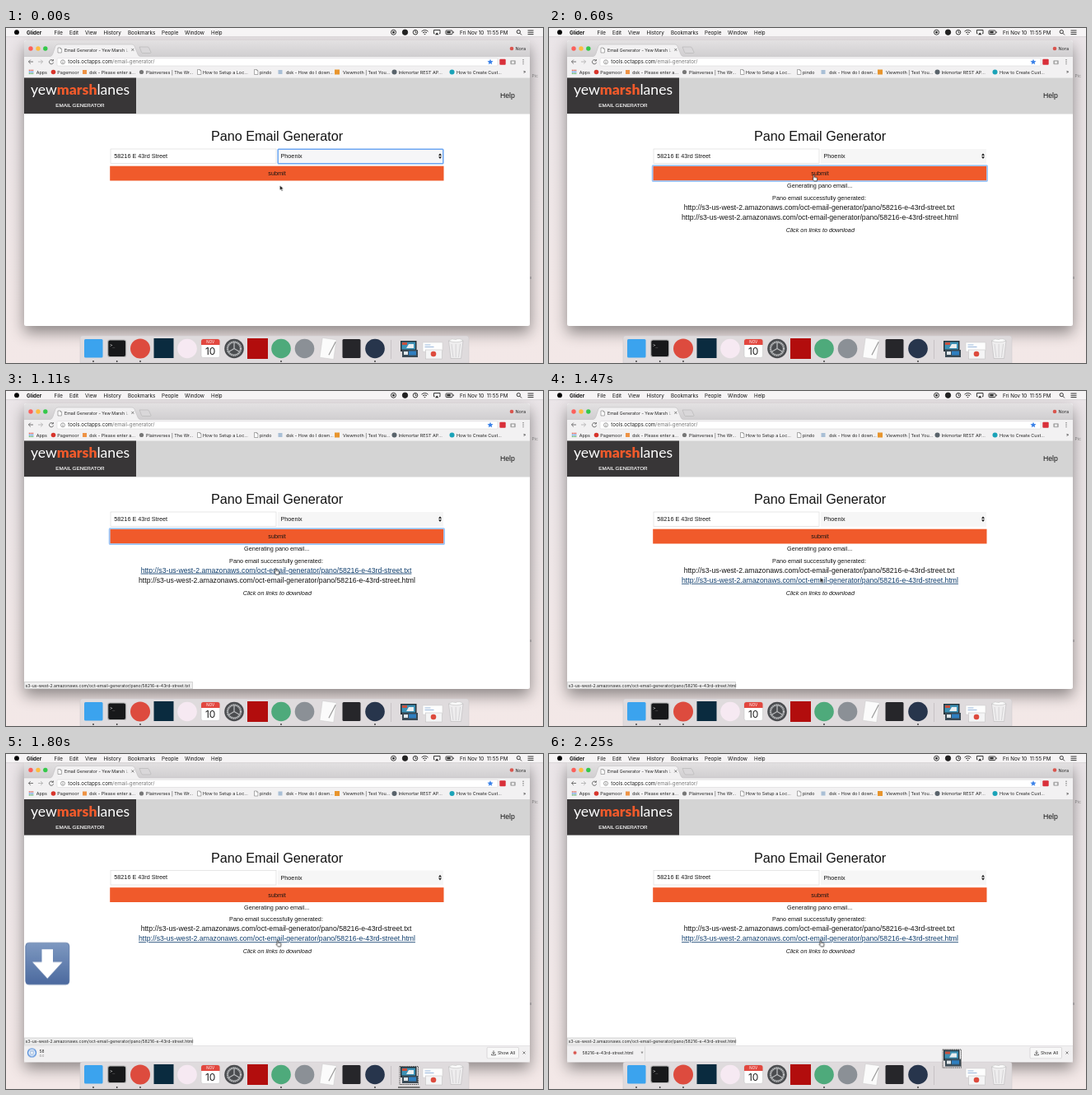
An HTML page for the animation above (2280 ms loop, 652 by 407 pixels).

```html
<!DOCTYPE html>
<html lang="en">
<head>
<meta charset="utf-8">
<title>Pano Email Generator</title>
<style>
html, body { margin: 0; width: 100%; height: 100%; overflow: hidden; background: #ebe6e8; }
svg { display: block; width: 652px; height: 407px; }
text { font: 6.25px Inter, sans-serif; fill: #111; white-space: pre; }
.mid { text-anchor: middle; }
.ui text { font-size: 5.45px; fill: #222; }
.page text { font: 7.24px "Liberation Sans", Arial, sans-serif; fill: #141414; }
.page .h1 { font-size: 16.2px; }
.page .big { font-size: 8.69px; }
.page .logo { font: 400 17.6px Lato, sans-serif; fill: #fff; }
.logo tspan { font-weight: 900; fill: #f05a2b; }
.page .sub { font-size: 6.25px; fill: #fff; stroke: #fff; stroke-width: .15px; }
.page .it { font-style: italic; }
.small text { font-size: 5.15px; fill: #222; }

/* s: hard switches, m: motion; --k names the keyframes */
.s, .m { animation: var(--k) 2280ms step-end infinite; }
.m { animation-timing-function: linear; }

@keyframes pick { 0% { visibility: visible } 13.16%, 100% { visibility: hidden } }
@keyframes press { 0%, 60.53%, 100% { visibility: hidden } 13.16% { visibility: visible } }
@keyframes working { 0% { visibility: hidden } 14.47%, 100% { visibility: visible } }
@keyframes done { 0% { visibility: hidden } 19.74%, 100% { visibility: visible } }
@keyframes link1 {
  0%, 55.26%, 100% { fill: #141414; text-decoration-line: none }
  43.42% { fill: #12406f; text-decoration-line: underline }
}
@keyframes link2 {
  0% { fill: #141414; text-decoration-line: none }
  55.26%, 100% { fill: #12406f; text-decoration-line: underline }
}
@keyframes status { 0% { visibility: hidden } 48.68%, 100% { visibility: visible } }
@keyframes url1 { 0% { opacity: 1 } 55.26%, 100% { opacity: 0 } }
@keyframes url2 { 0% { opacity: 0 } 55.26%, 100% { opacity: 1 } }

@keyframes move {
  0% { transform: translate(332.5px, 191px); animation-timing-function: ease-in-out }
  10.53%, 27.63% { transform: translate(321px, 178.5px); animation-timing-function: ease-in-out }
  46.05%, 51% { transform: translate(327px, 215.5px); animation-timing-function: ease-in-out }
  60.53%, 100% { transform: translate(329.3px, 226.5px) }
}
@keyframes arrow {
  0%, 31.58%, 61.84% { visibility: visible }
  9%, 39.47%, 69.74%, 100% { visibility: hidden }
}
@keyframes hand {
  0%, 31.58%, 61.84% { visibility: hidden }
  9%, 39.47%, 69.74%, 100% { visibility: visible }
}

@keyframes rise { 0%, 73.68% { transform: none } 77.63%, 100% { transform: translateY(-5.5px) } }
@keyframes grow { 0%, 73.68% { height: 347px } 77.63%, 100% { height: 364.5px } }
@keyframes lift { 0%, 73.68% { transform: none } 77.63%, 100% { transform: translateY(-3px) } }
@keyframes shelf { 0%, 73.68% { height: 0 } 77.63%, 100% { height: 20px } }
@keyframes items { 0% { visibility: hidden } 76.32%, 100% { visibility: visible } }
@keyframes start { 0% { opacity: 1 } 82.89%, 100% { opacity: 0 } }
@keyframes name { 0% { opacity: 0 } 82.89%, 100% { opacity: 1 } }
@keyframes spin { 0% { opacity: 1 } 92.11%, 100% { opacity: 0 } }
@keyframes file { 0% { opacity: 0 } 92.11%, 100% { opacity: 1 } }
@keyframes reveal {
  0%, 76.32% { transform: translateX(40px) }
  78.95% { transform: translateX(46px) }
  88.16% { transform: translateX(95px) }
  92.11%, 100% { transform: translateX(118px) }
}
@keyframes drop {
  0%, 74.99% { transform: translateY(-21px); opacity: 0 }
  75% { transform: translateY(-21px); opacity: .4 }
  78.95% { transform: none; opacity: .95 }
  81.58% { opacity: .95 }
  88.16% { transform: translateY(49.5px); opacity: .58 }
  93.42%, 100% { transform: translateY(77px); opacity: 0 }
}
@keyframes frame { 0% { visibility: hidden } 77.63%, 100% { visibility: visible } }
@keyframes bar { 0%, 80.26%, 100% { visibility: hidden } 77.63% { visibility: visible } }
@keyframes bounce {
  0%, 80.26% { transform: none; animation-timing-function: cubic-bezier(.333, .667, .667, 1) }
  92.76% { transform: translateY(-26.5px); animation-timing-function: cubic-bezier(.333, 0, .667, .333) }
  100% { transform: translateY(-17.6px) }
}
.win { filter: drop-shadow(0 8px 9px rgba(0, 0, 0, .42)); }
</style>
</head>
<body>
<svg viewBox="0 0 652 407">
  <defs>
    <linearGradient id="wall" x2="0" y2="1"><stop stop-color="#eae5e8"/><stop offset="1" stop-color="#f3e8e7"/></linearGradient>
    <linearGradient id="strip" x2="0" y2="1"><stop stop-color="#e3e1e2"/><stop offset="1" stop-color="#d0ced0"/></linearGradient>
    <linearGradient id="blue" x2="0" y2="1"><stop stop-color="#7894be"/><stop offset="1" stop-color="#42629a"/></linearGradient>
    <g id="sheet"><path d="M-2-3H1L2.4-1.6V3H-2Z" fill="#fff" stroke="#777" stroke-width=".6"/><path d="M1-3V-1.6H2.4" fill="none" stroke="#777" stroke-width=".5"/></g>
  </defs>

  <rect width="652" height="407" fill="url(#wall)"/>
  <text x="638.5" y="59.5" style="font-size:5px;fill:#888">Pic</text>
  <rect x="636" y="302" width="2" height="3" fill="#c9c3c5"/>

  <!-- browser window -->
  <g class="m" style="--k:rise">
    <rect class="m win" style="--k:grow" x="22" y="15" width="614" height="347" rx="2.5" fill="#fff"/>
    <g class="ui">
      <path d="M22 35V18Q22 15 25 15H633Q636 15 636 18V35Z" fill="url(#strip)"/>
      <circle cx="30" cy="25" r="2.7" fill="#fc605b"/>
      <circle cx="39" cy="25" r="2.7" fill="#fdbc40"/>
      <circle cx="47.8" cy="25" r="2.7" fill="#34c84a"/>
      <path d="M22 34.5H54Q56 34 57 31L60 22Q61 20 63 20H153Q155 20 156 22L160 32Q161 34.5 163 34.5H636V60.5H22Z" fill="#f2f1f2"/>
      <path d="M22 34.5H54Q56 34 57 31L60 22Q61 20 63 20H153Q155 20 156 22L160 32Q161 34.5 163 34.5H636" fill="none" stroke="#b9b7b9" stroke-width=".5"/>
      <path d="M162 23H172Q173 23 173.5 24L176 29.5Q176 30.5 175 30.5H166Q165 30.5 164.5 29.5Z" fill="#d9d7d9" stroke="#aaa" stroke-width=".5"/>
      <use href="#sheet" x="65" y="27"/>
      <text x="71" y="28.7" style="font-size:5.3px">Email Generator - Yew Marsh<tspan fill="#aaa"> L</tspan></text>
      <path d="M152.3 24.9l3 3m0-3l-3 3" stroke="#555" stroke-width=".7"/>
      <circle cx="614" cy="25" r="2.3" fill="#d9554e"/>
      <text x="618.5" y="27">Nora</text>
      <g fill="none" stroke="#555" stroke-width=".8">
        <path d="M33 41H27.5M29.8 38.6L27.4 41L29.8 43.4"/>
        <path d="M39 41H44.5M42.2 38.6L44.6 41L42.2 43.4" stroke="#aaa"/>
        <path d="M57 39.5A2.6 2.6 0 1 0 57.6 41.8M57.4 38V39.9H55.5"/>
      </g>
      <rect x="62" y="36.7" width="535" height="9.3" rx="1.3" fill="#fff" stroke="#d2d0d2" stroke-width=".5"/>
      <circle cx="69" cy="41.3" r="2.5" fill="none" stroke="#666" stroke-width=".6"/>
      <path d="M69 40.8V42.8M69 39.6V40.1" stroke="#666" stroke-width=".7"/>
      <text x="75.3" y="43.4" style="font-size:6.2px">tools.octapps.com<tspan fill="#777">/email-generator/</tspan></text>
      <path d="M588 37.8l1 2.3 2.5.2-1.9 1.6.6 2.4-2.2-1.3-2.2 1.3.6-2.4-1.9-1.6 2.5-.2Z" fill="#3b82e8"/>
      <rect x="599.3" y="37.7" width="7.4" height="7" rx="1" fill="#d9303a"/>
      <rect x="612.3" y="39.2" width="6.5" height="5" rx="1" fill="#aaa"/>
      <circle cx="615.5" cy="41.7" r="1.5" fill="#f2f1f2"/>
      <g fill="#666"><circle cx="628" cy="38.8" r=".7"/><circle cx="628" cy="41.2" r=".7"/><circle cx="628" cy="43.6" r=".7"/></g>

      <g fill="none" stroke-width="1.4" stroke-dasharray="1.4 .6">
        <path d="M27.8 51.4H33.6" stroke="#db5045"/><path d="M27.8 53.4H33.6" stroke="#4688e0"/><path d="M27.8 55.4H33.6" stroke="#44a85c"/>
      </g>
      <text x="36.7" y="55.5">Apps</text>
      <circle cx="57.5" cy="53.5" r="2.8" fill="#d7352c"/><text x="62.3" y="55.5">Pagemoor</text>
      <rect x="93" y="51" width="5" height="5" fill="#ee9345"/><text x="101" y="55.5">dsk - Please enter a...</text>
      <circle cx="164.5" cy="53.5" r="2.6" fill="#777"/><text x="170" y="55.5">Plainverses | The Wr...</text>
      <use href="#sheet" x="234.5" y="53.5"/><text x="239" y="55.5">How to Setup a Loc...</text>
      <use href="#sheet" x="303.5" y="53.5"/><text x="308" y="55.5">pindo</text>
      <rect x="330.5" y="51" width="5" height="5" fill="#a9bfd6"/><text x="340" y="55.5">dsk - How do I down...</text>
      <rect x="399" y="50.5" width="6" height="6" fill="#e8952e"/><text x="409" y="55.5">Viewmoth | Test You...</text>
      <circle cx="471.5" cy="53.5" r="3" fill="#59636b"/><text x="476.5" y="55.5">Inkmortar REST AP...</text>
      <circle cx="541.5" cy="53.5" r="3" fill="#1ba3b8"/><text x="547" y="55.5">How to Create Cust...</text>
      <text x="628" y="55.3">»</text>
    </g>

    <g class="page">
      <rect x="22" y="60.5" width="614" height="44" fill="#d4d4d4"/>
      <rect x="22" y="60.5" width="136" height="43.5" fill="#383637"/>
      <text class="logo mid" x="90" y="81">yew<tspan>marsh</tspan>lanes</text>
      <text class="sub mid" x="90" y="96.2">EMAIL GENERATOR</text>
      <text class="big" x="600" y="84.5">Help</text>
      <text class="h1 mid" x="329" y="137.4">Pano Email Generator</text>

      <rect x="127" y="147" width="201" height="17.5" fill="#fff" stroke="#ddd" stroke-width=".7"/>
      <text x="131.3" y="157.8">58216 E 43rd Street</text>
      <rect x="330" y="147" width="201" height="17.7" fill="#f6f6f6"/>
      <rect class="s" style="--k:pick" x="330.2" y="147.2" width="200.6" height="17.6" rx=".8" fill="#f6f6f8" stroke="#6ba6f2" stroke-width="1.5"/>
      <text x="333.5" y="158.2">Phoenix</text>
      <path d="M525 154.9L527 152.2L529 154.9ZM525 156.3L527 159L529 156.3Z" fill="#222"/>

      <rect x="126.2" y="167.7" width="405.3" height="17.8" fill="#f05a2b"/>
      <rect class="s" style="--k:press" x="125.6" y="167.1" width="406.5" height="19" rx=".8" fill="none" stroke="#9cc5f7" stroke-width="1.8"/>
      <text class="mid" x="329" y="179.2">submit</text>

      <text class="mid s" style="--k:working" x="328.7" y="194.3">Generating pano email...</text>
      <g class="s" style="--k:done">
        <text class="mid" x="328" y="208.9">Pano email successfully generated:</text>
        <text class="big mid s" style="--k:link1" x="328" y="220.6">http://s3-us-west-2.amazonaws.com/oct-email-generator/pano/58216-e-43rd-street.txt</text>
        <text class="big mid s" style="--k:link2" x="329" y="232.8">http://s3-us-west-2.amazonaws.com/oct-email-generator/pano/58216-e-43rd-street.html</text>
        <text class="mid it" x="329.3" y="247.8">Click on links to download</text>
      </g>
    </g>

    <g class="small">
      <g class="s" style="--k:status"><g class="m" style="--k:lift">
        <rect x="22.2" y="353.4" width="204.5" height="8.4" rx=".6" fill="#eee" stroke="#b5b5b5" stroke-width=".6"/>
        <text class="s" style="--k:url1" x="23.5" y="359.6">s3-us-west-2.amazonaws.com/oct-email-generator/pano/58216-e-43rd-street.txt</text>
        <text class="s" style="--k:url2" x="23.5" y="359.6">s3-us-west-2.amazonaws.com/oct-email-generator/pano/58216-e-43rd-street.html</text>
      </g></g>
      <rect class="m" style="--k:shelf" x="22" y="359.5" width="614" height="0" fill="#f1f0f1"/>
      <g class="s" style="--k:items">
        <path d="M22 359.6H636" stroke="#c4c2c4" stroke-width=".6"/>
        <g class="s" style="--k:start"><text x="40.5" y="368.8">58216-e-43rd</text><text x="40.5" y="373.6" style="font-size:4px;fill:#777">0.0 KB</text></g>
        <text class="s" style="--k:name" x="40.5" y="370.4">58216-e-43rd-street.html</text>
        <path d="M111.5 367.4h3l-1.5 1.8Z" fill="#555"/>
        <path d="M116.5 361V378" stroke="#ccc" stroke-width=".6"/>
        <rect class="m" style="--k:reveal" y="360.2" width="90" height="19" fill="#f1f0f1"/>
        <g class="s" style="--k:spin">
          <circle cx="31.5" cy="368.5" r="5" fill="#dbe8f8" stroke="#4a87d8" stroke-width="1.2"/>
          <rect x="30" y="366.6" width="3" height="3.8" fill="#fff" stroke="#6c93c8" stroke-width=".6"/>
        </g>
        <circle class="s" style="--k:file" cx="31.5" cy="368.5" r="2" fill="#d9554e"/>
        <rect x="584" y="361.8" width="38.5" height="13.6" rx="1.5" fill="#f8f8f8" stroke="#c6c4c6" stroke-width=".6"/>
        <path d="M592 365.8V369.6M590.3 368L592 369.8L593.7 368M589.5 370V371.3H594.5V370" fill="none" stroke="#444" stroke-width=".8"/>
        <text x="597" y="370.4">Show All</text>
        <path d="M627.5 367l3 3m0-3l-3 3" stroke="#555" stroke-width=".7"/>
      </g>
    </g>
  </g>

  <!-- menu bar -->
  <rect width="652" height="10.4" fill="#f6f4f5"/>
  <path d="M0 10.6H652" stroke="#c9c5c7" stroke-width=".5"/>
  <circle cx="13" cy="5.2" r="2.9"/>
  <text x="25" y="7.5" style="font-weight:700">Glider</text>
  <text x="58.5" y="7.5">File</text><text x="77" y="7.5">Edit</text><text x="96" y="7.5">View</text>
  <text x="118.5" y="7.5">History</text><text x="148" y="7.5">Bookmarks</text><text x="189" y="7.5">People</text>
  <text x="217" y="7.5">Window</text><text x="249" y="7.5">Help</text>
  <g fill="none" stroke="#222" stroke-width=".9">
    <circle cx="470.5" cy="5.2" r="3"/><circle cx="470.5" cy="5.2" r="1" fill="#222"/>
    <circle cx="484.5" cy="5.2" r="3.2" fill="#222"/>
    <circle cx="497" cy="5.2" r="2.8"/><path d="M497 3.4V5.3H498.6"/>
    <path d="M504.5 4.2Q508.5 .8 512.5 4.2M506 5.8Q508.5 3.8 511 5.8M507.7 7.5H509.3"/>
    <path d="M520.5 6.8H519.5V2.5H527V6.8H526"/><path d="M521 8.3L523.2 5.6L525.4 8.3Z" fill="#222" stroke="none"/>
    <rect x="534" y="3" width="8" height="4.5" rx=".8"/><path d="M535.3 5.2H539.8" stroke-width="2.2"/><path d="M543.3 4.4V6.1"/>
    <circle cx="622.3" cy="4.6" r="2.1"/><path d="M623.8 6.2L626 8.4"/>
    <path d="M633.5 3H640.5M633.5 5.3H640.5M633.5 7.6H640.5"/>
  </g>
  <text x="551" y="7.5">Fri Nov 10  11:55 PM</text>

  <!-- dock -->
  <path d="M90 407V377Q90 374 93 374H559Q562 374 562 377V407Z" fill="#dfdbdd" stroke="#cbc6c9" stroke-width=".5"/>
  <rect x="95" y="378" width="22.5" height="22.5" rx="1.5" fill="#3ba3ee"/>
  <rect x="123.7" y="379" width="22" height="20.5" rx="2.5" fill="#17181a" stroke="#b6b6b6" stroke-width="1.2"/>
  <text x="126.3" y="387" style="font:5px 'DejaVu Sans Mono',monospace;fill:#eee">&gt;_</text>
  <circle cx="163" cy="389.5" r="12" fill="#dd4b3e"/>
  <rect x="179.5" y="377" width="24" height="24" fill="#0a2b3f"/>
  <circle cx="220" cy="389.5" r="11.8" fill="#f6e9f2"/>
  <rect x="237" y="378" width="22.5" height="22.5" rx="2.5" fill="#fff" stroke="#c8c8c8" stroke-width=".6"/>
  <path d="M237 385V380.5Q237 378 239.5 378H257Q259.5 378 259.5 380.5V385Z" fill="#e2473f"/>
  <text class="mid" x="248.2" y="383.4" style="font-size:4.5px;fill:#fff">NOV</text>
  <text class="mid" x="248.2" y="397" style="font-size:12px;fill:#222">10</text>
  <circle cx="277" cy="389.5" r="11.8" fill="#4b4d50"/>
  <circle cx="277" cy="389.5" r="8" fill="none" stroke="#b9bbbd" stroke-width="2.4" stroke-dasharray="1.6 .5"/>
  <path d="M277 389.5V382M277 389.5L270.5 393.2M277 389.5L283.5 393.2" stroke="#b9bbbd" stroke-width="1.3"/>
  <rect x="293" y="377" width="25" height="25" fill="#b20d0d"/>
  <circle cx="334" cy="389.5" r="11.8" fill="#4eaa7b"/>
  <circle cx="362.5" cy="389.5" r="11.8" fill="#8b9096"/>
  <g transform="rotate(8 391 389.5)"><rect x="382.5" y="377.5" width="17" height="24" fill="#fbfbfb" stroke="#ccc" stroke-width=".5"/><path d="M399 380L393 397" stroke="#999" stroke-width="1.2"/></g>
  <rect x="408.5" y="378" width="22" height="23" rx="1.5" fill="#26262a"/>
  <circle cx="448" cy="389.5" r="11.8" fill="#27354c"/>
  <path d="M467.5 379V402" stroke="#b7b2b5" stroke-width=".6"/>
  <g fill="#333"><circle cx="106" cy="405" r=".9"/><circle cx="134.7" cy="405" r=".9"/><circle cx="163" cy="405" r=".9"/><circle cx="334" cy="405" r=".9"/><circle cx="448" cy="405" r=".9"/></g>
  <rect class="s" style="--k:bar" x="476" y="404" width="26.5" height="2" fill="#777"/>
  <g transform="translate(506.5 382)">
    <rect x="-.5" width="24" height="11" fill="#fdfdfd" stroke="#ccc" stroke-width=".5"/>
    <path d="M2 3H9M2 5.5H13" stroke="#9bb8dc" stroke-width="1"/>
    <rect x="3" y="9" width="20" height="11" fill="#f4f4f5" stroke="#bbb" stroke-width=".5"/>
    <circle cx="12.5" cy="14" r="3.3" fill="#dd4b3e"/>
  </g>
  <path d="M537.5 380H555L552.5 401.5H540Z" fill="#eeedee" stroke="#bdbabd" stroke-width=".6"/>
  <path d="M541 384L543 400M546.2 384V400M551.5 384L549.5 400" stroke="#cfcdd0" stroke-width=".8"/>
  <path d="M537.5 380Q541 376.5 546 378.5Q551 376 555 380Q546 383.5 537.5 380Z" fill="#fafafa" stroke="#bbb" stroke-width=".5"/>
  <g class="m" style="--k:bounce">
    <rect x="479" y="380" width="19.5" height="13" fill="#27333a"/>
    <rect x="480.5" y="381.5" width="16.5" height="9" fill="#3d91b5"/>
    <path d="M481 382h6v3h-6Z" fill="#c8503c"/><path d="M489 384h6v5h-9Z" fill="#e9eef0"/>
    <path d="M481 391H500V400H481Z" fill="#3a4a55"/>
    <path d="M483 393h5v4h-5Z" fill="#dfe6ea"/><path d="M489 392.5h9v5h-9Z" fill="#2f7fc0"/>
    <rect class="s" style="--k:frame" x="478" y="379.5" width="22.5" height="22" fill="none" stroke="#222" stroke-width=".8" stroke-dasharray="1.4 .9"/>
  </g>

  <!-- falling download badge -->
  <g class="m" style="--k:drop">
    <rect x="23.8" y="229.2" width="53" height="50.6" rx="4" fill="url(#blue)" stroke="#4d6a9c" stroke-width=".8"/>
    <path d="M43.5 237H57V252.5H68.5L50.3 272.5L32 252.5H43.5Z" fill="#fff"/>
  </g>

  <!-- pointer -->
  <g class="m" style="--k:move">
    <path class="s" style="--k:arrow" d="M0 0V6.2L1.4 4.9L2.4 7.2L3.5 6.7L2.5 4.5H4.4Z" stroke="#fff" stroke-width=".6"/>
    <path class="s" style="--k:hand" d="M-.1 .2Q.6-.4 1.2 .3L1.4 2.8L4 3.2Q4.9 3.5 4.8 4.6L4.2 7.5H.9L-1.3 4.6Q-1 3.8 0 4.4Z" fill="#fff" stroke="#111" stroke-width=".7"/>
  </g>
</svg>
</body>
</html>
```
